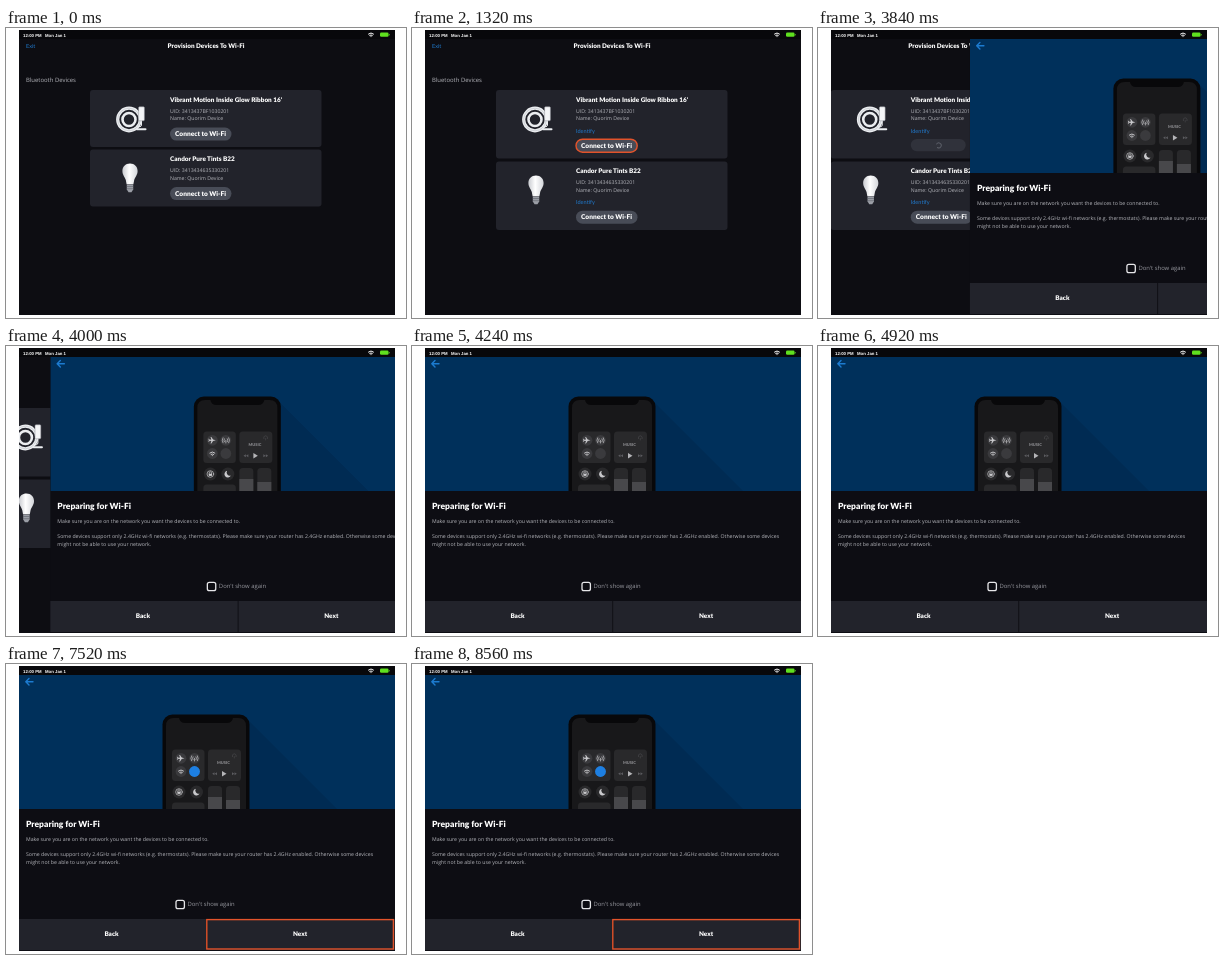
Write an HTML page that moves like this. It is 400x290 px and loops after 8600 ms.

```html
<!DOCTYPE html>
<html lang="en">
<head>
<meta charset="utf-8">
<style>
  html, body { margin: 0; width: 100%; height: 100%; overflow: hidden; background: #fff; }
  svg { display: block; width: 400px; height: 290px; }
  text { font-family: "Open Sans", "Noto Sans", sans-serif; font-size: 5.2px; fill: #b4b5bb; text-rendering: geometricPrecision; white-space: pre; }
  .head { font-family: Lato, sans-serif; font-weight: 900; font-size: 6.4px; fill: #fff; }
  .link { font-family: Lato, sans-serif; font-size: 5.6px; fill: #2079cc; }
  .status { font-family: "Liberation Sans", Arial, sans-serif; font-weight: 700; font-size: 4.3px; fill: #fff; }
  .mid { text-anchor: middle; }
  .line { fill: none; stroke-linecap: round; stroke-linejoin: round; }
</style>
</head>
<body>
<svg viewBox="0 0 400 290">
  <defs>
    <clipPath id="screen"><rect x="13" y="2" width="376" height="285"/></clipPath>
    <clipPath id="scene"><rect x="13" y="11" width="376" height="134"/></clipPath>
    <linearGradient id="glass">
      <stop offset="0" stop-color="#c9cbd0"/><stop offset=".45" stop-color="#fff"/><stop offset="1" stop-color="#d3d5da"/>
    </linearGradient>
    <g id="wifi" class="line" stroke-width="1">
      <path d="M-2.5-.8Q0-3 2.5-.8M-1.3.6Q0-.5 1.3.6M0 1.8V1.9"/>
    </g>
  </defs>
  <g clip-path="url(#screen)">
    <rect x="13" y="2" width="376" height="285" fill="#0d0d12"/>
    <g id="list">
      <text class="link" x="20" y="20.2">Exit</text>
      <text class="head mid" x="200" y="20.3">Provision Devices To Wi-Fi</text>
      <text x="20" y="54.2" style="font-size:5.95px">Bluetooth Devices</text>
      <g id="cards"></g>
    </g>
    <g id="panel">
      <rect x="13" y="11" width="376" height="276" fill="#0d0d13"/>
      <g clip-path="url(#scene)">
        <rect x="13" y="11" width="376" height="134" fill="#00305b"/>
        <path d="M239 53L331 145H230Z" fill="#002b53"/>
        <rect x="156.5" y="50.5" width="87" height="120" rx="10" fill="#08080a"/>
        <path d="M160 145V62q0-8 8-8h5q1 5 6 5h42q5 0 6-5h5q8 0 8 8v83Z" fill="#18181a"/>
        <g id="controls"></g>
      </g>
      <path class="line" d="M27 17.7H20M23 14.5L19.8 17.7L23 20.9" stroke="#1c7bd0" stroke-width="1.4"/>
      <text class="head" x="20" y="163.3" style="font-size:8.5px">Preparing for Wi-Fi</text>
      <g style="font-weight:500">
        <text x="20" y="177.4">Make sure you are on the network you want the devices to be connected to.</text>
        <text x="20" y="192">Some devices support only 2.4GHz wi-fi networks (e.g. thermostats). Please make sure your router has 2.4GHz enabled. Otherwise some devices</text>
        <text x="20" y="199.6">might not be able to use your network.</text>
      </g>
      <rect x="170" y="236.3" width="8.4" height="8.4" rx="2" fill="none" stroke="#e6e6e9" stroke-width="1.3"/>
      <text x="181.5" y="242.4" style="font-size:5.9px;fill:#96979e">Don't show again</text>
      <path d="M13 255H200.3V286H13ZM201.2 255H389V286H201.2Z" fill="#22232b"/>
      <text class="head mid" x="105.5" y="272.2">Back</text>
      <text class="head mid" x="294" y="272.2">Next</text>
      <rect id="nextRing" x="200.8" y="255.6" width="186.6" height="29.4" fill="none" stroke="#e2532b" stroke-width="1.4"/>
    </g>
    <rect x="13" y="2" width="376" height="9" fill="#08080b"/>
    <text class="status" x="17" y="9.4">12:00 PM</text>
    <text class="status" x="39" y="9.4">Mon Jan 1</text>
    <use href="#wifi" x="365" y="6.8" stroke="#fff"/>
    <rect x="374" y="4.6" width="8.6" height="4.2" rx="1.3" fill="#5fe01f"/>
    <rect x="383" y="6" width=".8" height="1.4" rx=".4" fill="#5fe01f"/>
  </g>
</svg>
<script>
const LOOP = 8600;
const EXPAND = 480, PRESS = 1000, LOADING = 2240, SLIDE = 3680, SLIDE_MS = 570;
const RADIO_ON = 5200, NEXT = 5800;
const $ = id => document.getElementById(id);
const clamp = v => Math.max(0, Math.min(1, v));
const show = (id, on) => $(id).style.display = on ? '' : 'none';
const shift = (id, x, y = 0) => $(id).setAttribute('transform', `translate(${x} ${y})`);

const strip = `
  <g class="line" stroke="#eceef1">
    <circle cx="123" cy="91.5" r="11.3" stroke-width="3.2"/>
    <circle cx="123" cy="91.5" r="11.3" stroke="#b3b6bc" stroke-width=".5"/>
    <circle cx="123" cy="91.5" r="6.5" stroke-width="2.6"/>
    <path d="M131 101.2H139.5" stroke-width="2"/>
    <path d="M135.5 92V97Q135 100 131 98" stroke-width="1"/>
  </g>
  <rect x="132.6" y="78.8" width="5.8" height="14" rx="1" fill="#f4f5f7" stroke="#8c8f97" stroke-width=".5"/>`;
const bulb = `
  <path d="M124 76c4.6 0 7.6 3.3 7.6 7.4 0 4-2.6 6-3.4 9l-.8 4.4h-6.8l-.8-4.4c-.8-3-3.4-5-3.4-9 0-4.1 3-7.4 7.6-7.4Z" fill="url(#glass)"/>
  <path d="M120.8 97H127.2V102L125.5 104.8H122.5L120.8 102Z" fill="#9b9ea6"/>
  <path d="M120.8 99H127.2M120.8 101.2H127.2" stroke="#5d6068" stroke-width=".6"/>`;

const card = (n, icon, title, uid) => `
  <g id="card${n}">
    <rect id="box${n}" x="84" y="62" width="231.5" height="57" rx="3" fill="#22232b"/>
    ${icon}
    <text class="head" x="164" y="73.7">${title}</text>
    <text x="164" y="84.6">UID: ${uid}</text>
    <text x="164" y="92.2">Name: Quorim Device</text>
    <text class="link" id="link${n}" x="164" y="104.8">Identify</text>
    <g id="button${n}">
      <rect x="164" y="99.6" width="61.5" height="13" rx="6.5" fill="#484c57"/>
      <text class="head mid" x="194.6" y="108.3" style="font-size:6.6px">Connect to Wi-Fi</text>
    </g>
  </g>`;
$('cards').innerHTML =
  card(0, strip, "Vibrant Motion Inside Glow Ribbon 16'", '3413437BF1030201') +
  card(1, bulb, 'Candor Pure Tints B22', '3413434635330201') + `
  <rect id="ring" x="164" y="111.2" width="61.2" height="13" rx="6.5" fill="none" stroke="#e2532b" stroke-width="1.4"/>
  <g id="loader">
    <rect x="164" y="111" width="55" height="12.2" rx="6.1" fill="#30323b"/>
    <path id="spinner" class="line" d="M192 114.9a2.5 2.5 0 1 1-2.5 2.5" stroke="#5b5e68" stroke-width=".9"/>
  </g>`;

const tile = (x, y, w, h, fill = '#29292b') => `<rect x="${x}" y="${y}" width="${w}" height="${h}" rx="3.5" fill="${fill}"/>`;
const dot = (x, y, r = 5.4, extra = 'fill="#3a3a3d"') => `<circle cx="${x}" cy="${y}" r="${r}" ${extra}/>`;
$('controls').innerHTML =
  tile(166, 85.5, 32.5, 31.5) + tile(202, 85.5, 33, 31.5) +
  tile(202, 122, 14, 30) + tile(220, 122, 14, 30) + tile(166, 138.5, 32.5, 12) +
  dot(175, 94.3) + dot(188.5, 94.3) + dot(175, 107.5) + dot(188.5, 107.5) +
  dot(188.5, 107.5, 5.4, 'id="radio" fill="#1d7fe2"') +
  dot(173, 128, 6.5, 'fill="#29292b"') + dot(190.5, 128, 6.5, 'fill="#29292b"') + `
  <path d="M202 133H216V145H202ZM220 136H234V145H220Z" fill="#48484b"/>
  <path d="M178.5 94.3L175.7 93.6 174 91H173.2L174 93.6 172.4 93.8 171.6 92.8H171L171.5 94.3 171 95.8H171.6L172.4 94.8 174 95 173.2 97.6H174L175.7 95Z" fill="#c9c9cc"/>
  <g class="line" stroke="#c9c9cc" stroke-width=".7">
    <path d="M188.5 94.3V97M187 92.8Q186 94.3 187 95.8M190 92.8Q191 94.3 190 95.8M185.6 91.8Q184 94.3 185.6 96.8M191.4 91.8Q193 94.3 191.4 96.8"/>
    <circle cx="173" cy="128" r="3.3"/>
    <path d="M171.8 128V127a1.2 1.2 0 0 1 2.4 0V128"/>
  </g>
  <rect x="171.4" y="127.7" width="3.2" height="2.2" fill="#c9c9cc"/>
  <use href="#wifi" x="175" y="107.8" stroke="#c9c9cc"/>
  <path d="M189.8 124.8a3.4 3.4 0 1 0 3.8 4.7 3.2 3.2 0 0 1-3.8-4.7Z" fill="#c9c9cc"/>
  <text class="head mid" x="217.5" y="100" style="font-size:4px;fill:#88888c">MUSIC</text>
  <path d="M216 107L220.5 109.7 216 112.4Z" fill="#b5b5b8"/>
  <path d="M208.5 108.2V111.2L206.2 109.7ZM211 108.2V111.2L208.7 109.7ZM226 108.2V111.2L228.3 109.7ZM228.5 108.2V111.2L230.8 109.7Z" fill="#5c5c60"/>
  <path class="line" d="M226.5 92.7a2 2 0 1 1 3.6 0M228.3 92.5V94" stroke="#4c4c50" stroke-width=".6"/>`;

function draw(t) {
  const open = t >= EXPAND;
  const loading = t >= LOADING;
  for (const n of [0, 1]) {
    show('link' + n, open);
    $('box' + n).setAttribute('height', open ? 68.5 : 57);
    shift('button' + n, 0, open ? 11.6 : 0);
  }
  shift('card1', 0, open ? 71.5 : 59.5);
  show('button0', !loading);
  show('ring', t >= PRESS && !loading);
  show('loader', loading);
  $('spinner').setAttribute('transform', `rotate(${t * .36 % 360} 192 117.4)`);

  const slide = 1 - (1 - clamp((t - SLIDE) / SLIDE_MS)) ** 3;
  shift('list', -113 * slide);
  shift('panel', 376 * (1 - slide));
  show('list', slide < 1);
  show('panel', slide > 0);
  $('radio').setAttribute('opacity', clamp((t - RADIO_ON) / 160));
  show('nextRing', t >= NEXT);
}

const start = performance.now();
function frame() {
  draw((performance.now() - start) % LOOP);
  requestAnimationFrame(frame);
}
frame();
</script>
</body>
</html>
```
